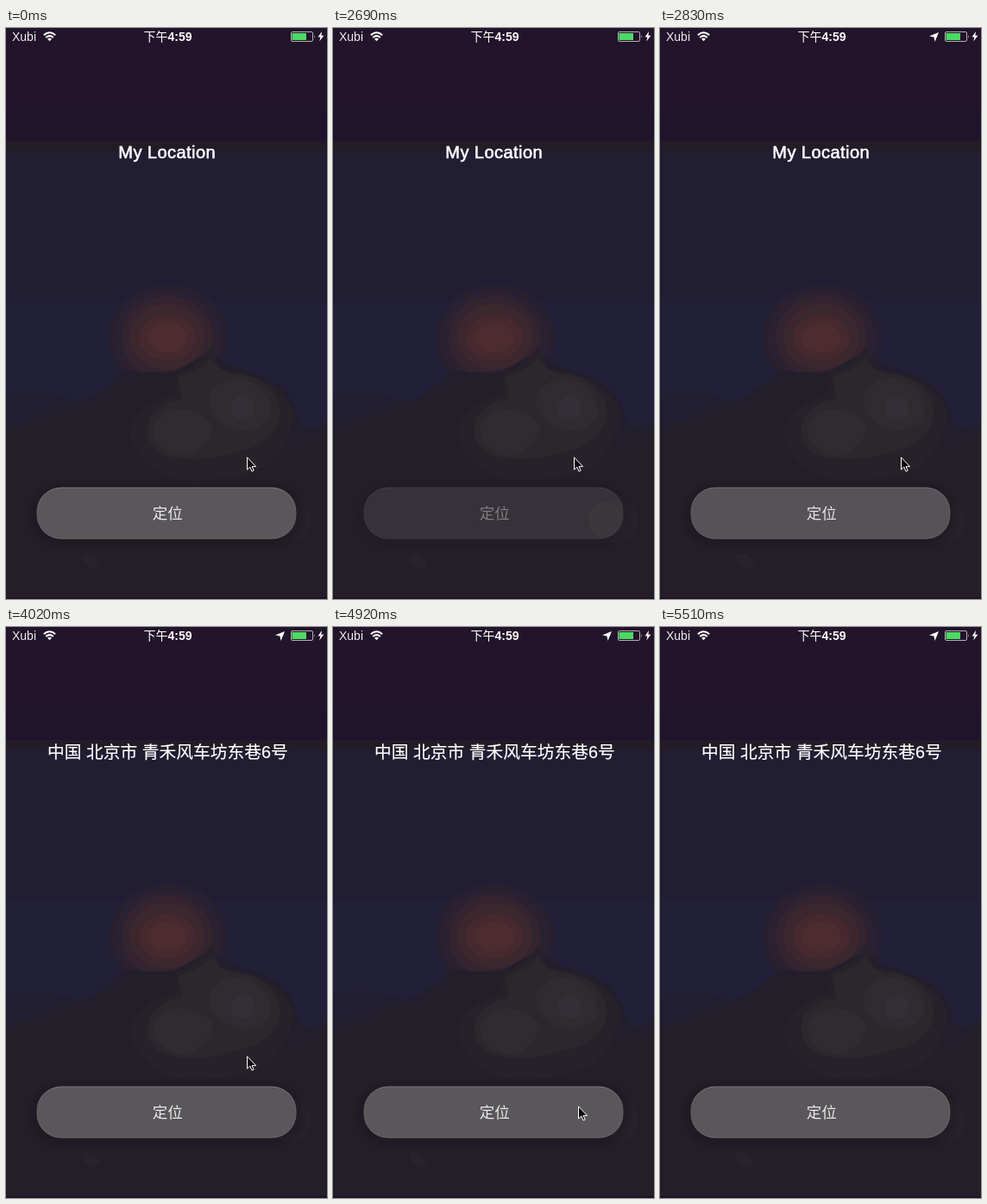
These frames come from a looping animation (372 by 662 pixels, 7.16 s). An HTML page:

```html
<!DOCTYPE html>
<html lang="zh">
<head>
<meta charset="utf-8">
<title>My Location</title>
<style>
html, body { margin: 0; width: 100%; height: 100%; overflow: hidden; background: #241e28; }
svg { display: block; width: 100%; height: 100%; }
text { font-family: "Liberation Sans", "Noto Sans CJK SC", "Noto Sans CJK", sans-serif; fill: #fff; }
.mid { text-anchor: middle; }
#title { font-size: 20px; letter-spacing: .45px; stroke: #fff; stroke-width: .6px; }
#address { font-size: 19.75px; stroke: #fff; stroke-width: .2px; }
</style>
</head>
<body>
<svg viewBox="0 0 372 662" preserveAspectRatio="none">
  <defs>
    <filter id="soft" x="-10%" y="-30%" width="120%" height="160%"><feGaussianBlur stdDeviation="4"/></filter>
    <linearGradient id="rim" x2="0" y2="1">
      <stop offset="0" stop-color="#fff" stop-opacity=".18"/>
      <stop offset=".5" stop-color="#fff" stop-opacity=".03"/>
      <stop offset="1" stop-color="#fff" stop-opacity=".1"/>
    </linearGradient>
  </defs>

  <!-- dusk sky -->
  <rect width="372" height="662" fill="#241e28"/>
  <rect width="372" height="94" fill="#22142a"/>
  <rect y="94" width="372" height="37" fill="#1f142b"/>
  <rect y="131" width="372" height="12" fill="#231c26"/>
  <rect y="143" width="372" height="175" fill="#211d33"/>
  <rect y="318" width="372" height="175" fill="#212038"/>
  <path d="M0 426Q45 414 82 434L120 428V480H0Z" fill="#211e31"/>

  <g id="glow"></g>

  <!-- hills -->
  <path d="M0 464L40 448Q70 434 100 428L140 396Q166 402 196 398L236 376Q260 394 290 400Q326 412 336 440Q338 476 372 456V662H0Z" fill="#231e2c"/>
  <path d="M0 470L40 457Q70 442 100 437L148 406Q186 398 216 402L318 440Q326 488 340 488L372 464V662H0Z" fill="#241e28"/>
  <rect y="660" width="372" height="2" fill="#220f28"/>

  <!-- smoke -->
  <path d="M196 400Q226 392 238 368Q246 386 247 396Q312 402 333 444Q330 484 302 508Q252 530 192 522Q148 502 143 468Q150 440 194 424Q202 410 196 400Z" fill="#27222a"/>
  <path d="M199 404Q230 396 238 381Q246 402 276 402Q314 412 318 448Q312 482 268 491Q214 508 176 492Q156 472 168 450Q180 434 204 430Q202 414 199 404Z" fill="#2b272d"/>
  <path d="M170 467Q174 444 203 442Q228 444 240 461Q236 488 206 496Q176 492 170 467Z" fill="#2f2b2f"/>
  <path d="M235 430Q240 408 272 406Q304 414 307 446Q296 472 264 464Q236 454 235 430Z" fill="#2f2c31"/>
  <path d="M261 436Q268 424 282 428Q292 438 285 450Q272 458 262 448Z" fill="#323036"/>
  <path d="M88 611Q99 605 109 618Q108 629 97 626Q87 619 88 611Z" fill="#28222b"/>
  <circle cx="329" cy="572" r="25" fill="#27212a"/>
  <circle cx="316" cy="570" r="20" fill="#2a252c"/>

  <!-- status bar -->
  <text x="7" y="15" font-size="14" opacity=".92">Xubi</text>
  <g fill="none" stroke="#fff" stroke-width="2">
    <path d="M43.8 8.2Q50.5 2.2 57.2 8.2"/>
    <path d="M46.2 11Q50.5 7.2 54.8 11"/>
  </g>
  <path d="M48 12.7Q50.5 10.8 53 12.7L50.5 15.3Z" fill="#fff"/>
  <text class="mid" x="187.5" y="15" font-size="14" font-weight="500">下午<tspan font-weight="700">4:59</tspan></text>
  <path id="arrow" d="M323 5L318.6 16L317.4 10.6L312 9.6Z" fill="#fff"/>
  <rect x="330.5" y="4.5" width="25" height="11" rx="1.5" fill="none" stroke="#b5afb8"/>
  <rect x="331.5" y="6" width="16.5" height="8" fill="#4cd964"/>
  <path d="M357 8Q358.8 10 357 12Z" fill="#b5afb8"/>
  <path d="M366 4L361.6 10.6H364.4L363.2 15.6L368.4 8.8H365.4Z" fill="#fff"/>

  <text id="title" class="mid" x="186.7" y="151">My Location</text>
  <text id="address" class="mid" x="187.4" y="151.5">中国 北京市 青禾风车坊东巷6号</text>

  <!-- button -->
  <g id="plate">
    <rect x="32" y="533" width="308" height="64" rx="30" fill="#120c16" opacity=".4" filter="url(#soft)"/>
    <rect x="35.5" y="532.5" width="301" height="60" rx="28.5" fill="#5a575b"/>
    <rect x="36" y="533" width="300" height="59" rx="28" fill="none" stroke="url(#rim)"/>
  </g>
  <text id="label" class="mid" x="187.3" y="568.5" font-size="17.5">定位</text>

  <path id="cursor" d="M.5 .8V15L3.8 12L6 17L8.2 16L6 11.4H10.6Z" fill="#0b0a0c" stroke="#fff" stroke-linejoin="round"/>
</svg>
<script>
const LOOP = 7160;
const $ = id => document.getElementById(id);
const show = (id, on) => $(id).setAttribute("visibility", on ? "visible" : "hidden");

// Each glow ring: centre, radii, colour.
const rings = [
  [188, 360, 70, 63, "#262031"],
  [187, 360, 63, 56, "#2b2131"],
  [187, 359, 53, 48, "#332430"],
  [187, 358, 44, 38, "#3c272f"],
  [187, 359, 33, 26, "#46292f"],
  [187, 359, 23, 17, "#4c2c2e"]
];
$("glow").innerHTML = rings.map(([x, y, rx, ry, c]) =>
  `<ellipse cx="${x}" cy="${y}" rx="${rx}" ry="${ry}" fill="${c}"/>`).join("");

// Start time, plate opacity, label opacity.
const press = [
  [0, 1, .88], [2540, .1, .19], [2690, .36, .36], [2830, .93, .84], [2980, 1, .88]
];
// Start time, pointer tip.
const moves = [
  [0, 279, 497], [4920, 284, 555], [5070, 286, 603], [5220, 287, 603], [5370, 309, 632]
];
const stepAt = (steps, t) => steps.filter(s => s[0] <= t).pop();

function draw(t) {
  const [, plate, label] = stepAt(press, t);
  const [, x, y] = stepAt(moves, t);
  $("plate").setAttribute("opacity", plate);
  $("label").setAttribute("opacity", label);
  $("cursor").setAttribute("transform", `translate(${x} ${y})`);
  show("cursor", t < 5510);
  show("arrow", t >= 2830);
  show("title", t < 4020);
  show("address", t >= 4020);
}

const start = performance.now();
function tick() {
  draw((performance.now() - start) % LOOP);
  requestAnimationFrame(tick);
}
tick();
</script>
</body>
</html>
```
